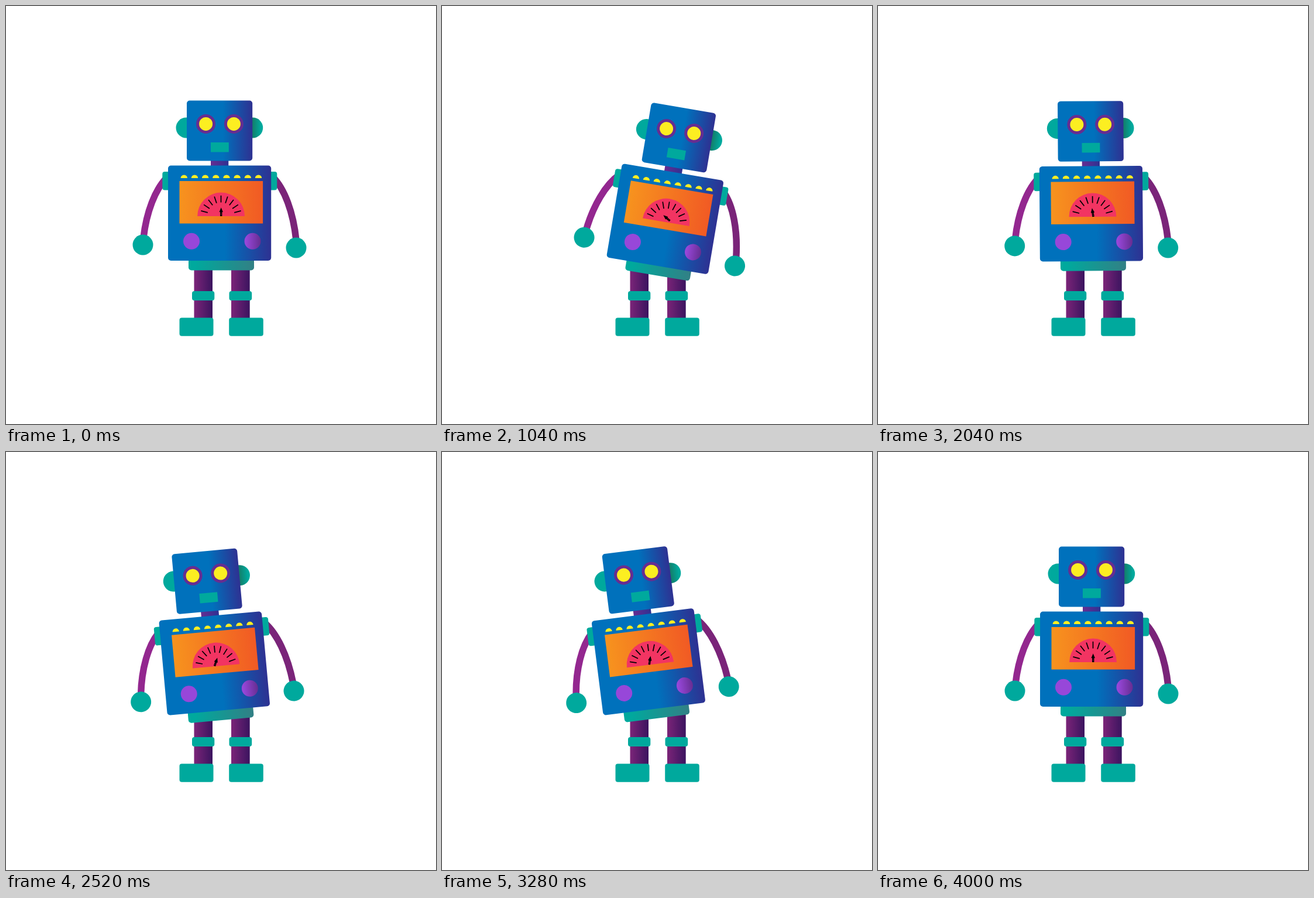
An HTML page for the animation above (4.04 s loop, 735 by 714 pixels).

```html
<!DOCTYPE html>
<html lang="en">
<head>
<meta charset="utf-8">
<title>Swaying robot</title>
<style>
  html, body { margin: 0; width: 100%; height: 100%; overflow: hidden; background: #fff; }
  svg { display: block; width: 100%; height: 100%; }
</style>
</head>
<body>
<svg viewBox="0 0 735 714">
  <defs>
    <linearGradient id="shell">
      <stop offset=".55" stop-color="#0071bc"/><stop offset="1" stop-color="#2e3192"/>
    </linearGradient>
    <linearGradient id="neck">
      <stop stop-color="#662d91"/><stop offset="1" stop-color="#2e3192"/>
    </linearGradient>
    <linearGradient id="ear">
      <stop offset=".5" stop-color="#12806c"/><stop offset=".9" stop-color="#00a99d"/>
    </linearGradient>
    <linearGradient id="panel">
      <stop stop-color="#f7931e"/><stop offset="1" stop-color="#f15a24"/>
    </linearGradient>
    <linearGradient id="knob">
      <stop offset=".1" stop-color="#9747d9"/><stop offset="1" stop-color="#662d91"/>
    </linearGradient>
    <linearGradient id="hips">
      <stop offset=".1" stop-color="#00a99d"/><stop offset="1" stop-color="#328085"/>
    </linearGradient>
    <linearGradient id="leg">
      <stop stop-color="#7b2478"/><stop offset="1" stop-color="#3b145f"/>
    </linearGradient>
  </defs>

  <g fill="url(#leg)">
    <rect x="321.5" y="435" width="31.5" height="100"/>
    <rect x="385" y="435" width="31.7" height="100"/>
  </g>
  <g fill="#00a99d">
    <rect x="318" y="487" width="38.3" height="16" rx="4"/>
    <rect x="381.5" y="487" width="38.7" height="16" rx="4"/>
    <rect x="296.5" y="532.5" width="58" height="31.3" rx="4"/>
    <rect x="381.2" y="532.5" width="58.6" height="31.3" rx="4"/>
  </g>

  <g id="upper">
    <g fill="none" stroke-width="11.5">
      <path stroke="#93278f" d="M275 293C255 313 240 352 235 396"/>
      <path stroke="#7a2479" d="M456 292C476 312 491 352 496 400"/>
    </g>
    <g fill="#00a99d">
      <circle cx="234" cy="408" r="17.5"/>
      <circle cx="496" cy="413" r="17.5"/>
      <rect x="267.3" y="283" width="16" height="31.5" rx="4"/>
      <rect x="447" y="283" width="16.3" height="31.5" rx="4"/>
      <circle cx="308" cy="208" r="17.5"/>
    </g>
    <circle cx="421.7" cy="208" r="17.5" fill="url(#ear)"/>
    <rect x="312" y="425" width="112" height="26.5" rx="5" fill="url(#hips)"/>
    <rect x="350" y="262" width="30.3" height="13" fill="url(#neck)"/>
    <rect x="309" y="161.5" width="112.2" height="103" rx="5" fill="url(#shell)"/>
    <g fill="#fcee21" stroke="#662d91" stroke-width="5">
      <circle cx="341.6" cy="201.4" r="14"/>
      <circle cx="389.4" cy="201.4" r="14"/>
    </g>
    <rect x="350" y="233" width="30.8" height="16.5" fill="#00a99d"/>
    <rect x="277" y="272.5" width="176.2" height="162.5" rx="5" fill="url(#shell)"/>
    <path id="lights" fill="#fcee21"/>
    <rect x="296.5" y="299" width="142.6" height="72.5" fill="url(#panel)"/>
    <path d="M327.2 359a40.4 40.4 0 0 1 80.8 0z" fill="#f23462"/>
    <path id="ticks" stroke="#000" stroke-width="1.7"/>
    <g id="needle">
      <path d="M0-7.8L3.2 0H1.7V7H-1.7V0H-3.2z"/>
      <path d="M-.5 2h1M-.5 4.6h1" stroke="#f23462" stroke-width=".8"/>
    </g>
    <circle cx="317" cy="401.8" r="14" fill="#9747d9"/>
    <circle cx="421.5" cy="401.8" r="14" fill="url(#knob)"/>
  </g>
</svg>

<script>
  const $ = id => document.getElementById(id);
  const STEP = 40, LOOP = 4040, CYCLE = 4000;

  // [time, degrees] pairs, linear in between
  const swayKeys = [[0, 0], [1000, 10], [3000, -10], [4000, 0]];
  const needleKeys = [
    [0, 0], [200, -40], [600, 40], [1000, -70], [1400, 40], [1800, -40], [2000, 0],
    [2200, -40], [2600, 40], [3000, -40], [3400, 40], [3800, -40], [4000, 0]
  ];

  function track(keys, t) {
    const i = Math.max(1, keys.findIndex(([time]) => time >= t));
    const [t0, a] = keys[i - 1], [t1, b] = keys[i];
    return a + (b - a) * (t - t0) / (t1 - t0);
  }

  $('lights').setAttribute('d', Array.from({ length: 8 }, (_, i) =>
    `M${298.6 + i * 18.17} 294a5.7 5.6 0 0 1 11.4 0z`).join(''));

  $('ticks').setAttribute('d', Array.from({ length: 9 }, (_, i) => {
    const angle = (15 + i * 18.75) * Math.PI / 180;
    const at = r => `${367.5 - r * Math.cos(angle)} ${359 - r * Math.sin(angle)}`;
    return `M${at(23.5)}L${at(35.3)}`;
  }).join(''));

  function draw(t) {
    const bob = 10 * Math.sin(Math.PI * t / 400) ** 2;
    $('upper').setAttribute('transform',
      `translate(0 ${bob}) rotate(${track(swayKeys, t)} 368 451)`);
    $('needle').setAttribute('transform',
      `translate(367.7 352) rotate(${track(needleKeys, t)})`);
  }

  const start = performance.now();
  function tick() {
    const elapsed = (performance.now() - start) % LOOP;
    draw(Math.min(CYCLE, Math.floor(elapsed / STEP) * STEP));
    requestAnimationFrame(tick);
  }
  tick();
</script>
</body>
</html>
```
